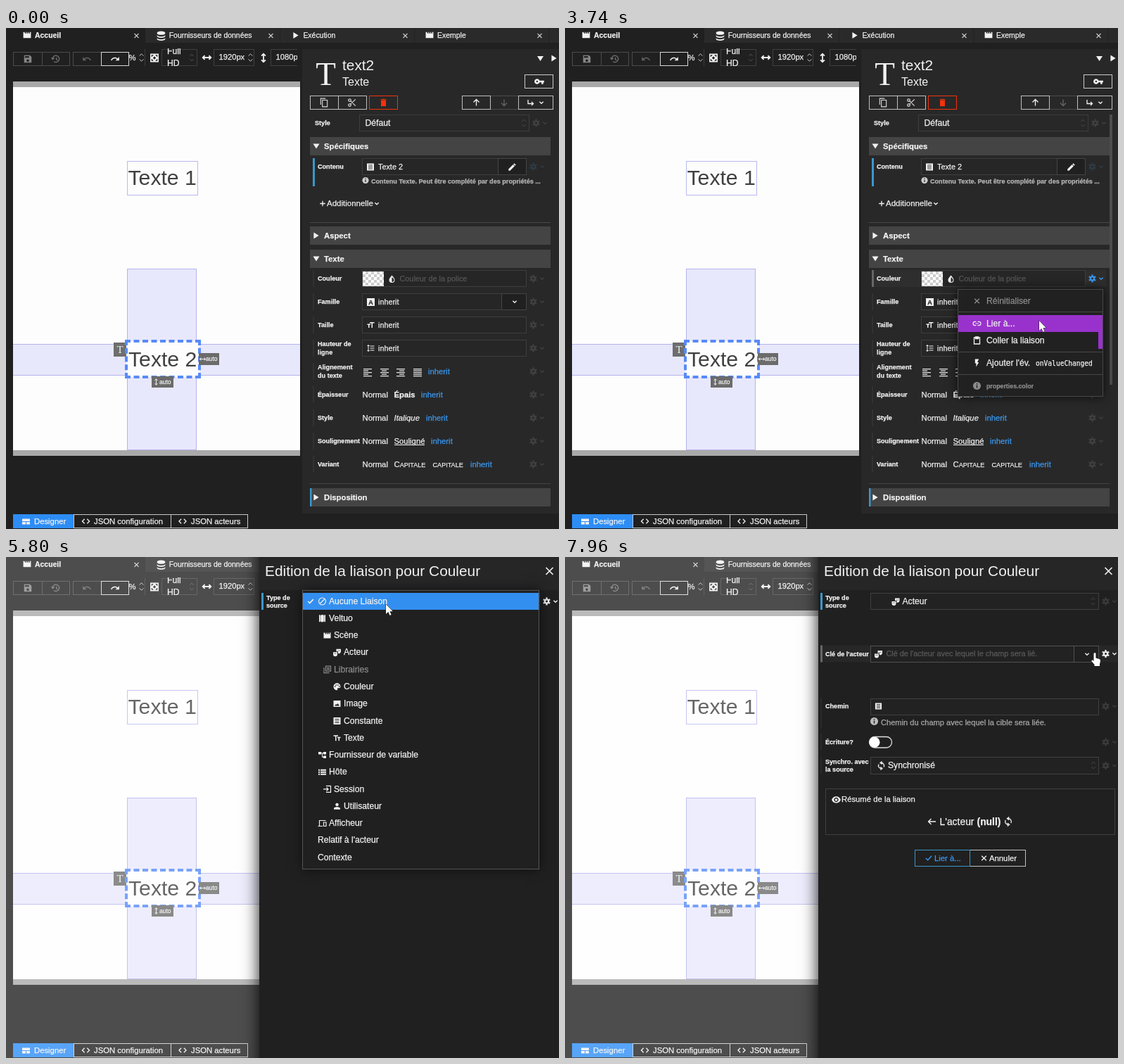
These frames come from a looping animation (786x712 px, 8000 ms). An HTML page with a canvas:

```html
<!DOCTYPE html>
<html lang="fr">
<head>
<meta charset="utf-8">
<title>Liaison de couleur</title>
<style>
html, body { margin: 0; width: 100%; height: 100%; overflow: hidden; background: #202020; }
canvas { display: block; }
</style>
</head>
<body>
<canvas id="stage" width="786" height="712"></canvas>
<script>
const ctx = document.getElementById('stage').getContext('2d');
const LOOP = 8000;
const SANS = '"Liberation Sans", Arial, sans-serif';
const SERIF = '"Liberation Serif", serif';
const WHITE = '#f2f2f2', BLUE = '#3b99f0', DIM = '#414141', GREY = '#8c8c8c';

// Icons on a 24-unit grid: filled shapes, then stroked ones.
const SOLID = {
  clapper: 'M18 4l2 4h-3l-2-4h-2l2 4h-3l-2-4H8l2 4H7L5 4H2v16h20V4z',
  database: 'M2 5a10 4 0 0 1 20 0v1a10 4 0 0 1-20 0zM2 10a10 4 0 0 0 20 0v3a10 4 0 0 1-20 0zM2 17a10 4 0 0 0 20 0v3a10 4 0 0 1-20 0z',
  save: 'M17 3H3v18h18V7zM12 19a3 3 0 1 1 .01 0zM15 9H5V5h10z',
  undo: 'M12.5 8c-2.7 0-5 1-7 2.6L2 7v9h9l-3.6-3.6c1.4-1.2 3.2-1.9 5.1-1.9 3.5 0 6.5 2.3 7.6 5.5l2.3-.8C21 11 17.2 8 12.5 8z',
  fit: 'M1 1h22v22H1zM4 4v6l6-6zM20 4h-6l6 6zM4 20h6l-6-6zM20 20v-6l-6 6zM12 8l4 4-4 4-4-4z',
  table: 'M1 4h22v7H1zM1 13h10v7H1zM13 13h10v7H13z',
  key: 'M12.6 10A6 6 0 1 0 12.6 14H17v4h4v-4h2v-4zM7 14a2 2 0 1 1 .01 0z',
  trash: 'M6 7h12v14H6zM19 4h-4l-1-1h-4l-1 1H5v2h14z',
  doc: 'M2 2h20v20H2zM6 6v2h12V6zM6 11v2h12v-2zM6 16v2h12v-2z',
  pencil: 'M3 17.200V21h3.800L17.800 9.900l-3.700-3.700zM21 7l-4-4-2 2 4 4z',
  drop: 'M12 1c4 5 8 9 8 13a8 8 0 0 1-16 0c0-4 4-8 8-13zM12 6v14a6 6 0 0 0 6-6c0-3-3-5-6-8z',
  info: 'M12 1a11 11 0 1 0 .01 0zM10.500 10h3v8h-3zM10.500 5h3v3h-3z',
  size: 'M9 4h13v3h-5v13h-3V7H9zM2 9h9v3H8v8H5v-8H2z',
  lineHeight: 'M10 5h12v2H10zM10 11h12v2H10zM10 17h12v2H10zM5 2l4 4H6v12h3l-4 4-4-4h3V6H1z',
  bolt: 'M7 2v11h3v9l7-12h-4l4-8z',
  film: 'M18 2v3h-2V2H8v3H6V2H3v20h3v-3h2v3h8v-3h2v3h3V2zM8 17H6v-2h2zM8 13H6v-2h2zM8 9H6V7h2zM18 17h-2v-2h2zM18 13h-2v-2h2zM18 9h-2V7h2z',
  masks: 'M1 11h12v6a6 6 0 0 1-12 0zM10 2h13v7a6 6 0 0 1-8 5.300V9h-5zM4 14h2v2H4zM8 14h2v2H8zM14 6h2v2h-2zM18 6h2v2h-2z',
  palette: 'M12 2a10 10 0 0 0 0 20c2 0 2-2 1-3s0-3 2-3h3a4 4 0 0 0 4-4c0-6-5-10-10-10zM5 10h3v3H5zM8 6h3v3H8zM13 6h3v3h-3zM17 10h3v3h-3z',
  image: 'M2 3h20v18H2zM5 18h14l-5-7-3 4-2-2z',
  tree: 'M1 3h8v7H1zM15 3h8v7h-8zM15 14h8v7h-8zM9 5.500h6v2h-2v9h2v2h-4v-11H9z',
  list: 'M1 4h4v4H1zM7 4h16v4H7zM1 10h4v4H1zM7 10h16v4H7zM1 16h4v4H1zM7 16h16v4H7z',
  person: 'M12 3a4.500 4.500 0 1 0 .01 0zM3 21v-3c0-3 6-4 9-4s9 1 9 4v3z',
  eye: 'M12 4C7 4 2.700 7 1 12c1.700 5 6 8 11 8s9.300-3 11-8c-1.700-5-6-8-11-8zM12 17.500a5.500 5.500 0 1 1 .01 0zM12 9a3 3 0 1 0 .01 0z'
};
const LINE = {
  history: 'M4 12a8 8 0 1 1 3 6M1 9l3 4 4-3M13 8v5l3 2',
  across: 'M2 12h20M7 7l-5 5 5 5M17 7l5 5-5 5',
  upright: 'M12 2v20M7 7l5-5 5 5M7 17l5 5 5-5',
  code: 'M8 5l-7 7 7 7M16 5l7 7-7 7',
  chevron: 'M4 8l8 8 8-8',
  stepper: 'M7 8l5-5 5 5M7 16l5 5 5-5',
  close: 'M4 4l16 16M20 4L4 20',
  copy: 'M16 2H4v15M8 6h12v16H8z',
  cut: 'M8 8L20 20M8 16L20 4M6 9a3 3 0 1 1 .01 0M6 21a3 3 0 1 1 .01 0',
  up: 'M12 21V3M4 11l8-8 8 8',
  down: 'M12 3v18M4 13l8 8 8-8',
  enter: 'M4 4v11h15M14 10l5 5-5 5',
  gear: 'M12 7a5 5 0 1 0 .01 0M12 2v3M12 19v3M3.300 7l2.600 1.500M18 15.500l2.600 1.500M3.300 17l2.600-1.500M18 8.500l2.600-1.500',
  link: 'M10 7H7a5 5 0 0 0 0 10h3M14 7h3a5 5 0 0 1 0 10h-3M8 12h8',
  clip: 'M4 4h16v18H4zM8 2h8v5H8z',
  ban: 'M12 2a10 10 0 1 0 .01 0M5 19L19 5',
  library: 'M3 6v15h15M8 2h14v14H8zM11 7h8M11 11h8',
  login: 'M9 3h13v18H9M1 12h14M10 7l5 5-5 5',
  devices: 'M22 4H4v15M0 20h13M16 9h7v11h-7z',
  sync: 'M12 4a8 8 0 0 1 7 12M13 1v6l-4-3zM12 20a8 8 0 0 1-7-12M11 17v6l4-3z',
  check: 'M3 12l6 6L21 5',
  back: 'M23 12H2M10 4l-8 8 8 8',
  plus: 'M12 2v20M2 12h20'
};

function icon(name, x, y, size, color = WHITE, width = 1.3, flip = 1) {
  const scale = size / 24;
  ctx.save();
  ctx.translate(x, y);
  ctx.scale(scale * flip, scale);
  ctx.translate(-12, -12);
  ctx.fillStyle = ctx.strokeStyle = color;
  ctx.lineWidth = width / scale;
  if (SOLID[name]) ctx.fill(new Path2D(SOLID[name]), 'evenodd');
  else ctx.stroke(new Path2D(LINE[name]));
  ctx.restore();
}

// y is the middle of the capitals; small text gets a hairline outline for weight.
function text(str, x, y, size, color = WHITE, style = '', family = SANS, align = 'left') {
  const baseline = Math.round(y + size * 0.344);
  ctx.font = `${style} ${size}px ${family}`;
  ctx.fillStyle = ctx.strokeStyle = color;
  ctx.textAlign = align;
  ctx.fillText(str, x, baseline);
  if (size < 14) {
    ctx.lineWidth = 0.25;
    ctx.strokeText(str, x, baseline);
  }
}

function fill(x1, y1, x2, y2, color) {
  ctx.fillStyle = color;
  ctx.fillRect(x1, y1, x2 - x1, y2 - y1);
}

function box(x1, y1, x2, y2, border, color) {
  if (color) fill(x1, y1, x2, y2, color);
  ctx.strokeStyle = border;
  ctx.lineWidth = 1;
  ctx.strokeRect(x1 + 0.5, y1 + 0.5, x2 - x1 - 1, y2 - y1 - 1);
}

// Dashes are spread so that every side starts and ends with a full one.
function dashedBox(x1, y1, x2, y2, width, color) {
  const dash = width * 2;
  const spread = length => {
    const count = Math.round((length + width) / (dash + width));
    const step = (length - dash) / (count - 1);
    return Array.from({ length: count }, (_, i) => i * step);
  };
  for (const d of spread(x2 - x1)) {
    fill(x1 + d, y1, x1 + d + dash, y1 + width, color);
    fill(x1 + d, y2 - width, x1 + d + dash, y2, color);
  }
  for (const d of spread(y2 - y1)) {
    fill(x1, y1 + d, x1 + width, y1 + d + dash, color);
    fill(x2 - width, y1 + d, x2, y1 + d + dash, color);
  }
}

function shadowed(blur, color, draw) {
  ctx.shadowBlur = blur;
  ctx.shadowColor = color;
  draw();
  ctx.shadowBlur = 0;
  ctx.shadowColor = 'transparent';
}

function clipped(x1, y1, x2, y2, draw) {
  ctx.save();
  ctx.beginPath();
  ctx.rect(x1, y1, x2 - x1, y2 - y1);
  ctx.clip();
  draw();
  ctx.restore();
}

function triangle(x, y, size, pointsDown, color = WHITE) {
  ctx.save();
  ctx.translate(x, y);
  if (pointsDown) ctx.rotate(Math.PI / 2);
  ctx.fillStyle = color;
  ctx.fill(new Path2D(`M${-size * 0.4} ${-size / 2}L${size * 0.4} 0L${-size * 0.4} ${size / 2}z`));
  ctx.restore();
}

function label(str, x, y) {
  const lines = str.split('|');
  lines.forEach((line, i) => text(line, x, y + (i - (lines.length - 1) / 2) * 11.3, 9.1, WHITE, 'bold'));
}

function gear(x, y, color = DIM) {
  icon('gear', x, y, 13, color, 2.3);
  icon('chevron', x + 12.5, y, 8, color);
}

function tabs() {
  fill(198, 0, 786, 21, '#2a2a2a');
  for (const x of [389, 580, 771]) fill(x, 0, x + 1, 21, '#222');
  ['Accueil', 'Fournisseurs de données', 'Exécution', 'Exemple'].forEach((name, i) => {
    text(name, 41 + i * 190.7, 10, 10.45, WHITE, i ? '' : 'bold');
    icon('close', 185.5 + i * 191, 11, 9, '#ccc', 1.1);
  });
  icon('clapper', 30, 10, 13);
  icon('database', 220.5, 11, 14);
  triangle(412, 10.5, 9);
  icon('clapper', 602, 10, 13);
}

function toolbar() {
  box(10, 34, 52, 54, '#4c4c4c');
  box(51, 34, 91, 54, '#4c4c4c');
  box(95, 34, 136, 54, '#4c4c4c');
  icon('save', 31, 44, 14, '#858585');
  icon('history', 71, 44, 14, '#707070');
  icon('undo', 115, 44, 14, '#606060');
  box(135, 34, 175, 54, '#d8d8d8');
  icon('undo', 155, 44, 14, WHITE, 1, -1);
  text('%', 174.5, 42, 11.3);
  fill(197, 30, 198, 54, '#3c3c3c');
  icon('stepper', 192.5, 42, 14, '#ccc', 1);
  icon('fit', 211, 42.5, 13);
  box(221, 30, 272, 54, '#404040');
  clipped(222, 29, 271, 54, () => {
    text('Full', 229, 33, 12.17);
    text('HD', 229, 50, 12.17);
  });
  icon('stepper', 264, 42, 13, '#555', 1);
  icon('across', 285.5, 42, 14, WHITE, 1.8);
  box(295, 30, 353, 54, '#404040');
  text('1920px', 302.5, 41.5, 11.2);
  icon('stepper', 347.5, 42, 14, '#ccc', 1);
  icon('upright', 366, 42.5, 14, WHITE, 1.8);
  clipped(370, 28, 414, 56, () => {
    box(376, 30, 430, 54, '#404040');
    text('1080px', 383.5, 41.5, 11.2);
  });
}

function workspace() {
  fill(10, 76, 418, 608, '#a9a9a9');
  fill(10, 84, 418, 600, '#fdfdfd');
  box(172, 189, 273, 238, '#b9b9f0');
  text('Texte 1', 173.5, 213, 30.2, '#404040');
  const band = '#e8e8fc', edge = '#b4b4ee';
  box(172, 342, 271, 600, edge, band);
  fill(10, 449, 418, 494, band);
  fill(10, 449, 418, 450, edge);
  fill(10, 493, 418, 494, edge);
  fill(153, 447, 171, 467, '#6e6e6e');
  text('T', 162, 457, 15, WHITE, '', SERIF, 'center');
  fill(171, 445, 275, 496, '#fdfdfd');
  dashedBox(169, 443, 277, 498, 4, '#588af8');
  text('Texte 2', 174, 471, 30.2, '#404040');
  fill(274, 462, 303, 479, '#6b6b6b');
  icon('across', 279.5, 470.5, 10, WHITE, 1);
  text('auto', 284, 470.5, 8.5);
  fill(207, 495, 238, 511, '#6b6b6b');
  icon('upright', 213.5, 503, 10, WHITE, 1);
  text('auto', 218, 503, 8.5);
}

function footer() {
  box(96, 691, 235, 711, '#c8c8c8');
  box(234, 691, 344, 711, '#c8c8c8');
  fill(10, 691, 96, 711, '#2d8df6');
  icon('table', 28.5, 701.5, 12);
  text('Designer', 40, 701, 11.3);
  icon('code', 113.5, 701, 11);
  text('JSON configuration', 125, 701, 11.3);
  icon('code', 251, 701, 11);
  text('JSON acteurs', 263, 701, 11.3);
}

function section(name, y, open) {
  fill(432, y - 13, 774, y + 13, '#444');
  triangle(441, y, 9, open);
  text(name, 452, y, 11.3, WHITE, 'bold');
}

function alignIcons(y) {
  const starts = [0, 2, 4, 0];
  [508, 532, 555, 579].forEach((x, mode) => {
    for (let i = 0; i < 5; i++) {
      const short = i % 2 && mode < 3;
      const left = x + (short ? starts[mode] : 0);
      fill(left, y - 5 + i * 2.5, left + (short ? 7 : 12), y - 3.7 + i * 2.5, '#ddd');
    }
  });
}

const ROWS = ['Couleur', 'Famille', 'Taille', 'Hauteur de|ligne', 'Alignement|du texte',
  'Épaisseur', 'Style', 'Soulignement', 'Variant'];
const rowY = i => 356 + i * 33;

function styleRows(hotRow, gearColor) {
  ROWS.forEach((name, i) => {
    const y = rowY(i), hot = i === hotRow;
    if (hot) fill(436, y - 12, 769, y + 12, '#2e2e2e');
    fill(436, y - 12, hot ? 439 : 438, y + 12, hot ? '#666' : '#323232');
    label(name, 443, y);
    gear(749.5, y, hot ? gearColor : DIM);
    if (i < 4) box(506, y - 12, 740, y + 12, '#3e3e3e', '#262626');
    if (i > 0 && i < 4) text('inherit', 529, y, 10.85);
    if (i > 4) text('Normal', 506.5, y, 11.3);
  });
  clipped(507, 346, 537, 367, () => {
    fill(507, 346, 537, 367, '#fff');
    for (let i = 0; i < 48; i++) {
      const x = 507 + (i % 8) * 4, y = 346 + (i >> 3) * 4;
      if ((i + (i >> 3)) % 2) fill(x, y, x + 4, y + 4, '#ccc');
    }
  });
  icon('drop', 548.5, 357, 12);
  text('Couleur de la police', 559.5, 356, 10.85, '#565656');
  fill(513, 384, 524, 395, WHITE);
  text('A', 518.5, 389.5, 9, '#222', 'bold', SANS, 'center');
  box(704, 377, 740, 401, '#444', '#202020');
  icon('chevron', 723, 389, 8);
  icon('size', 518.5, 422, 12);
  icon('lineHeight', 518.5, 455, 12);
  alignIcons(489);
  [600, 590, 597, 604, 660].forEach((x, i) => text('inherit', x, rowY(i + 4), 11.3, BLUE));
  text('Épais', 551.5, 521, 11.3, WHITE, 'bold');
  text('Italique', 551.5, 554, 11.3, WHITE, 'italic');
  text('Souligné', 551.5, 587, 11.3);
  fill(552, 592, 595, 593, WHITE);
  text('C', 551.5, 620, 11.3);
  text('APITALE', 559.7, 620.8, 9.1);
  text('CAPITALE', 606.5, 620.8, 9.1);
}

function inspector(hotRow, gearColor, scrollbar) {
  fill(421, 30, 786, 690, '#282828');
  text('T', 454.5, 65, 47, WHITE, '', SERIF, 'center');
  text('text2', 478, 53, 20.86);
  text('Texte', 478, 76, 16);
  triangle(759.5, 43.5, 9, true);
  triangle(779, 43, 9);
  box(737, 66, 778, 86, '#ccc');
  icon('key', 758, 76, 15);
  box(432, 96, 473, 116, '#c0c0c0');
  box(472, 96, 513, 116, '#c0c0c0');
  icon('copy', 452, 106, 14, '#ddd', 1.1);
  icon('cut', 492, 106, 14, '#ddd', 1.2);
  box(516, 96, 557, 116, '#f2330d');
  icon('trash', 536.5, 106, 14, '#f2330d');
  box(688, 96, 729, 116, '#4c4c4c');
  box(648, 96, 689, 116, '#c0c0c0');
  box(728, 96, 778, 116, '#c0c0c0');
  icon('up', 668.5, 106, 12);
  icon('down', 708, 106, 12, '#666');
  icon('enter', 746, 106, 12);
  icon('chevron', 761, 106, 8);

  label('Style', 439, 134.5);
  box(502, 123, 744, 147, '#3e3e3e');
  text('Défaut', 510.5, 134.5, 12.17);
  icon('stepper', 736, 135, 13, '#4c4c4c', 1);
  gear(753.5, 135);
  section('Spécifiques', 168, true);
  fill(436, 185, 439, 225, '#3a97cc');
  label('Contenu', 443, 197);
  box(506, 185, 700, 209, '#3e3e3e', '#262626');
  icon('doc', 518, 197.5, 12);
  text('Texte 2', 529, 197, 10.85);
  box(699, 185, 740, 209, '#444', '#202020');
  icon('pencil', 719.5, 197.5, 14);
  gear(749.5, 197, '#2f3c46');
  icon('info', 511, 216.5, 10, '#ccc');
  text('Contenu Texte. Peut être complété par des propriétés ...', 519, 217.5, 9.1, '#b5b5b5', 'bold');
  icon('plus', 450, 249.5, 9);
  text('Additionnelle', 456, 249, 11.5);
  icon('chevron', 527, 249.5, 8);
  fill(432, 276, 774, 277, '#484848');
  section('Aspect', 295, false);
  section('Texte', 328, true);
  styleRows(hotRow, gearColor);
  fill(432, 647, 774, 648, '#444');
  section('Disposition', 667, false);
  fill(432, 654, 434.5, 680, '#3a97cc');
  if (scrollbar) fill(774, 123, 778, 507, '#4d4d4d');
}

function contextMenu(linkHot) {
  shadowed(14, 'rgba(0,0,0,.7)', () => fill(558, 371, 765, 524, '#212121'));
  box(558, 371, 765, 524, '#484848');
  fill(linkHot ? 559 : 758, 408, 764, 432, '#9932cc');
  fill(758, 432, 764, 456, '#9932cc');
  for (const y of [403, 460, 492]) fill(559, y, 764, y + 1, '#484848');
  icon('close', 585.5, 388, 10, GREY);
  text('Réinitialiser', 599, 388, 12.17, GREY);
  icon('link', 585.5, 420, 13, WHITE, 1.2);
  text('Lier à...', 599, 420, 12.17);
  icon('clip', 585.5, 444, 12);
  text('Coller la liaison', 599, 444, 12.17);
  icon('bolt', 585.5, 476, 13);
  text("Ajouter l'év.", 599, 476, 12.17);
  text('onValueChanged', 669, 477, 9.6, WHITE, '', '"DejaVu Sans Mono", monospace');
  icon('info', 585.5, 508.5, 12, GREY);
  text('properties.color', 599, 509, 8.8, GREY, 'bold');
}

function dialogButtons(y, active) {
  const color = active ? BLUE : '#245270';
  box(575, y - 12, 655, y + 12, '#c0c0c0');
  box(497, y - 12, 576, y + 12, active ? '#3a97cc' : '#28485a');
  icon('check', 517, y, 11, color);
  text('Lier à...', 525, y, 11.3, color);
  icon('close', 595.5, y, 10);
  text('Annuler', 603, y, 11.3);
}

function actorFields(keyHot) {
  const rows = [["Clé de l'acteur", 137.5, 12], ['Chemin', 212, 31], ['Écriture?', 263, 12], ['Synchro. avec|la source', 296.5, 12]];
  rows.forEach(([name, y, depth], i) => {
    const lit = keyHot && !i;
    if (lit) fill(363, y - 12, 786, y + depth, '#272727');
    fill(363, y - 12, lit ? 366 : 365, y + depth, lit ? '#666' : '#2a2a2a');
    label(name, 370, y);
    gear(768.5, y, lit ? WHITE : '#3c3c3c');
  });
  const border = keyHot ? '#505050' : '#404040';
  box(434, 126, 724, 150, border, '#222');
  icon('masks', 445.5, 138, 12);
  text("Clé de l'acteur avec lequel le champ sera lié.", 456.5, 137.5, 10.85, '#5a5a5a');
  box(723, 126, 759, 150, border, '#202020');
  icon('chevron', 742, 138, 8);
  box(434, 201, 759, 225, '#404040', '#222');
  icon('doc', 445.5, 212, 11);
  icon('info', 439.5, 233.5, 12, '#bbb');
  text('Chemin du champ avec lequel la cible sera liée.', 449, 235, 11.1, '#aaa');
  ctx.beginPath();
  ctx.roundRect(432.5, 255.5, 32, 15.5, 8);
  ctx.strokeStyle = '#ddd';
  ctx.lineWidth = 1.3;
  ctx.stroke();
  ctx.beginPath();
  ctx.arc(440, 263.2, 7.5, 0, 7);
  ctx.fillStyle = '#fff';
  ctx.fill();
  box(434, 284, 759, 309, '#404040', '#222');
  icon('sync', 449.5, 296.5, 12);
  text('Synchronisé', 459, 296, 12.17);
  icon('stepper', 751, 296, 13, '#4c4c4c', 1);
  box(370, 329, 782, 395, '#404040');
  icon('eye', 385.5, 345, 14);
  text('Résumé de la liaison', 393, 344.5, 11.3);
  icon('back', 521.5, 376, 12);
  text("L'acteur", 532.5, 376, 13.9);
  text('(null)', 585.5, 376, 13.9, WHITE, 'bold');
  icon('sync', 630, 376, 13);
}

function dialog(offset, typeHot, actor, keyHot) {
  ctx.save();
  ctx.translate(offset, 0);
  shadowed(22, 'rgba(0,0,0,.9)', () => fill(360, -30, 900, 742, '#202020'));
  fill(360, 0, 786, 47, '#262626');
  text('Edition de la liaison pour Couleur', 368, 20, 20.86);
  icon('close', 772.5, 20, 15, WHITE, 1.7);
  fill(363, 51, 366, 75, '#3a97cc');
  label('Type de|source', 370, 63.5);
  box(434, 51, 759, 75, '#404040', '#222');
  icon(actor ? 'masks' : 'ban', actor ? 470 : 449, 63.5, 12);
  text(actor ? 'Acteur' : 'Aucune Liaison', actor ? 479.5 : 459, 62.5, 12.17);
  icon('stepper', 750.5, 63, 13, '#4c4c4c', 1);
  gear(768.5, 63, typeHot ? WHITE : '#3c3c3c');
  if (actor) actorFields(keyHot);
  dialogButtons(actor ? 428 : 159, actor);
  ctx.restore();
}

// Label, icon, indent of the label.
const OPTIONS = [
  ['Aucune Liaison', 'ban', 459], ['Veltuo', 'film', 459], ['Scène', 'clapper', 466],
  ['Acteur', 'masks', 480], ['Librairies', 'library', 466], ['Couleur', 'palette', 480],
  ['Image', 'image', 480], ['Constante', 'doc', 480], ['Texte', 'size', 480],
  ['Fournisseur de variable', 'tree', 459], ['Hôte', 'list', 459], ['Session', 'login', 466],
  ['Utilisateur', 'person', 480], ['Afficheur', 'devices', 459],
  ["Relatif à l'acteur", '', 443], ['Contexte', '', 443]
];
const OPTION_STEP = 24.27;

function dropdown(hotOption, alpha) {
  ctx.globalAlpha = alpha;
  shadowed(16, 'rgba(0,0,0,.6)', () => fill(422, 47, 758, 444, '#202020'));
  box(421, 47, 758, 444, '#555');
  OPTIONS.forEach(([name, glyph, x], i) => {
    const y = 62.5 + i * OPTION_STEP;
    if (i === hotOption) fill(422, Math.round(y - 12), 757, Math.round(y + 12), '#338fef');
    const color = name === 'Librairies' ? GREY : WHITE;
    if (glyph) icon(glyph, x - 9.5, y + 0.5, 12, color, 1.2, glyph === 'size' ? -1 : 1);
    text(name, x, y, 12.17, color);
  });
  icon('check', 433, 63, 10, WHITE, 1.6);
  ctx.globalAlpha = 1;
}

const POINTERS = {
  arrow: 'M0 0V14L3.300 11L5.500 16L7.700 15L5.500 10.300H9.800z',
  hand: 'M-1.500 1.500a1.500 1.500 0 0 1 3 0v6l5 1.500q1.800.5 1.500 3l-1 4.500v2.500h-7.500v-2l-4-5q-.5-2 1.500-1.500l1.500 1.500z',
  beam: 'M-3-8h2l1 1 1-1h2M0-7V7M-3 8h2l1-1 1 1h2'
};

function pointer(kind, x, y) {
  ctx.save();
  ctx.translate(Math.round(x), Math.round(y));
  const shape = new Path2D(POINTERS[kind]);
  ctx.lineWidth = 1;
  ctx.strokeStyle = kind === 'beam' ? '#ddd' : '#111';
  ctx.fillStyle = '#fff';
  ctx.stroke(shape);
  if (kind !== 'beam') ctx.fill(shape);
  ctx.restore();
}

// Pointer stops: time, x, y.
const STOPS = [
  [790, 630, 722], [1590, 492, 354], [1660, 491.4, 357], [2130, 491.4, 357], [2480, 610, 370],
  [2810, 753, 360], [3480, 753, 360], [3740, 674, 416], [4370, 674, 416], [5000, 540, 67],
  [5790, 540, 67], [6350, 543, 132], [7360, 543, 132], [7960, 753, 136]
];

function pointerAt(t) {
  const next = STOPS.findIndex(stop => stop[0] > t);
  if (next < 1) return STOPS[next ? STOPS.length - 1 : 0].slice(1);
  const [t0, x0, y0] = STOPS[next - 1], [t1, x1, y1] = STOPS[next];
  const p = (t - t0) / (t1 - t0), e = p * p * (3 - 2 * p);
  return [x0 + (x1 - x0) * e, y0 + (y1 - y0) * e];
}

function pointerKind(t, x) {
  if (t < 2950) return x > 740 ? 'hand' : t > 2190 && x > 556 ? 'beam' : 'arrow';
  if (t < 4140) return x > 740 ? 'hand' : 'arrow';
  if (t < 6810) return 'arrow';
  return x > 723 ? 'hand' : 'beam';
}

function draw(t) {
  const [x, y] = pointerAt(t);
  const entered = t >= 850, menuOpen = t >= 2950 && t < 4140;
  const hotRow = !entered ? -1 : t > 2000 ? 0 : Math.round((y - 356) / 33);
  fill(0, 0, 786, 712, '#202020');
  tabs();
  toolbar();
  workspace();
  footer();
  inspector(hotRow, menuOpen ? BLUE : WHITE, entered);
  if (menuOpen) contextMenu(t > 3540 && y > 406);

  if (t >= 4140) {
    const veil = Math.min(1, (t - 4100) / 200);
    fill(0, 0, 786, 712, `rgba(255,255,255,${0.2 * veil})`);
    const left = Math.max(0, 1 - (t - 4100) / 300);
    dialog(Math.floor(426 * left ** 2.5), t >= 4930 && t < 6810, t >= 6740, t >= 6810);
    const fade = 1 - Math.max(0, t - 6800) / 150;
    if (t >= 5200 && fade > 0) {
      dropdown(t < 6740 ? Math.round((y - 62.5) / OPTION_STEP) : -1, fade);
    }
  }
  if (entered) pointer(pointerKind(t, x), x, y);
}

function tick() {
  draw(performance.now() % LOOP);
  requestAnimationFrame(tick);
}
tick();
</script>
</body>
</html>
```
